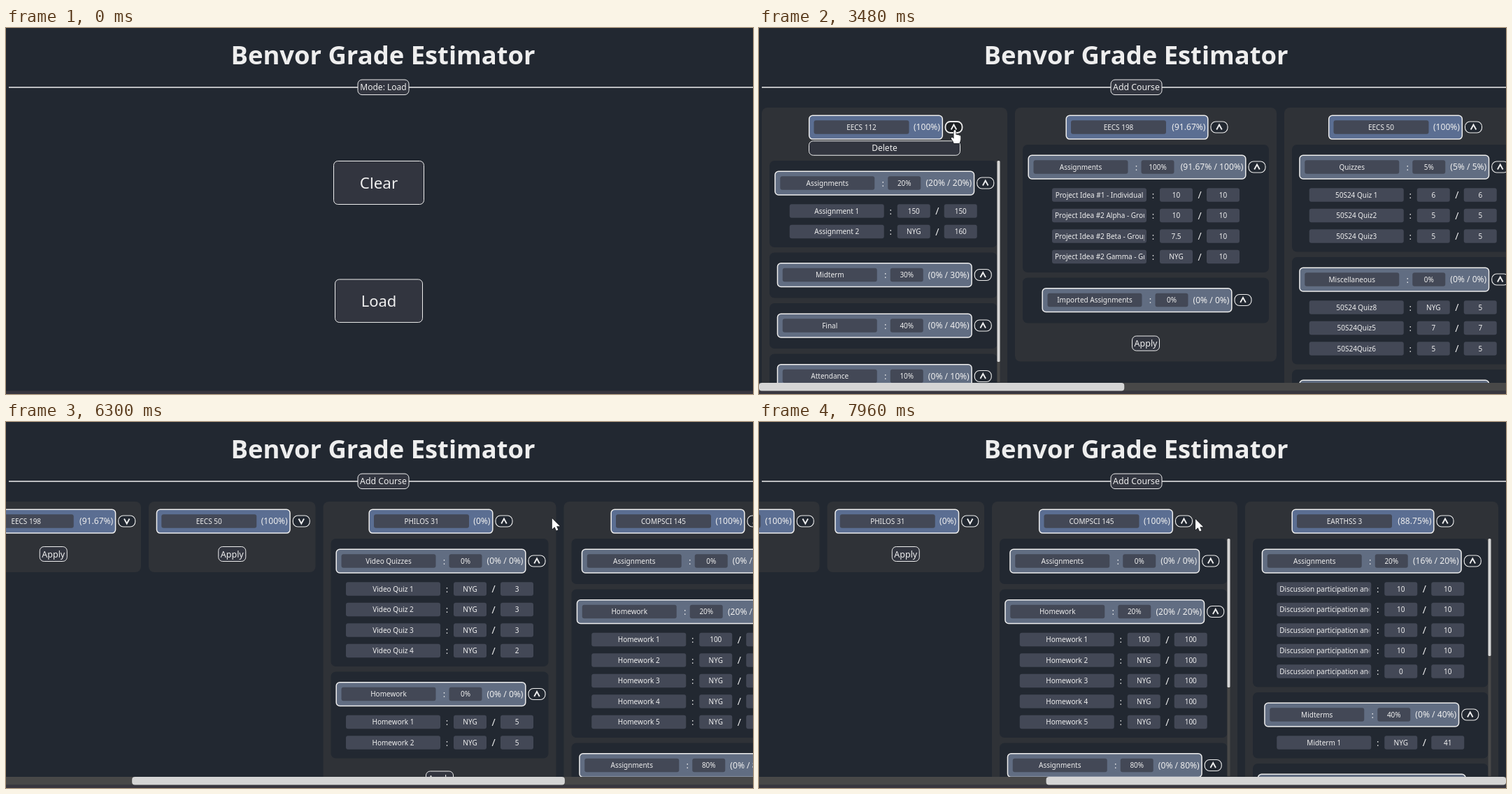
Animation of 1068 by 524 pixels, one loop 8 s. Source, as an HTML page:

```html
<!DOCTYPE html>
<html lang="en">
<head>
<meta charset="utf-8">
<title>Grade Estimator</title>
<style>
  html, body { margin: 0; width: 100%; height: 100%; overflow: hidden; background: #222831; }
  svg { display: block; }
  text { font-family: "Noto Sans", "Open Sans", sans-serif; fill: #eee; white-space: pre; }
</style>
</head>
<body>
<svg id="stage" width="1068" height="524"></svg>
<script>
const W = 1068, H = 524, LOOP = 8000, VIEW_BOTTOM = 508;
const stage = document.getElementById('stage');
const color = {
  page: '#222831', column: '#2f3237', button: '#32353f', hot: '#1d2023', input: '#434856',
  course: '#5b6e92', courseHot: '#272c3c', category: '#616d82', line: '#eeeeee',
  track: '#484848', thumb: '#d5d5d5', edge: '#38363f'
};

const cat = (name, weight, score, rows = []) => ({ name, weight, score, rows });
const series = (name, scores, totals) => scores.map((s, i) => [name + (i + 1), s, totals[i] ?? totals[0]]);

// "content" is the full height of a list that scrolls inside its column.
const courses = [
  { name: 'EECS 112', score: '(100%)', width: 351, content: 349, cats: [
    cat('Assignments', '20%', '(20% / 20%)', series('Assignment ', ['150', 'NYG'], ['150', '160'])),
    cat('Midterm', '30%', '(0% / 30%)'),
    cat('Final', '40%', '(0% / 40%)'),
    cat('Attendance', '10%', '(0% / 10%)')] },
  { name: 'EECS 198', score: '(91.67%)', width: 374, cats: [
    cat('Assignments', '100%', '(91.67% / 100%)', [
      ['Project Idea #1 - Individual', '10', '10'],
      ['Project Idea #2 Alpha - Group Work', '10', '10'],
      ['Project Idea #2 Beta - Group Work', '7.5', '10'],
      ['Project Idea #2 Gamma - Group Work', 'NYG', '10']]),
    cat('Imported Assignments', '0%', '(0% / 0%)')] },
  { name: 'EECS 50', score: '(100%)', width: 343, content: 741, cats: [
    cat('Quizzes', '5%', '(5% / 5%)', [
      ['50S24 Quiz 1', '6', '6'], ['50S24 Quiz2', '5', '5'], ['50S24 Quiz3', '5', '5']]),
    cat('Miscellaneous', '0%', '(0% / 0%)', [
      ['50S24 Quiz8', 'NYG', '5'], ['50S24Quiz5', '7', '7'], ['50S24Quiz6', '5', '5']]),
    cat('Homework', '5%', '(5% / 5%)')] },
  { name: 'PHILOS 31', score: '(0%)', width: 333, cats: [
    cat('Video Quizzes', '0%', '(0% / 0%)', series('Video Quiz ', Array(4).fill('NYG'), ['3', '3', '3', '2'])),
    cat('Homework', '0%', '(0% / 0%)', series('Homework ', ['NYG', 'NYG'], ['5']))] },
  { name: 'COMPSCI 145', score: '(100%)', width: 351, content: 543, cats: [
    cat('Assignments', '0%', '(0% / 0%)'),
    cat('Homework', '20%', '(20% / 20%)', series('Homework ', ['100', 'NYG', 'NYG', 'NYG', 'NYG'], ['100'])),
    cat('Assignments', '80%', '(0% / 80%)')] },
  { name: 'EARTHSS 3', score: '(88.75%)', width: 362, content: 688, cats: [
    cat('Assignments', '20%', '(16% / 20%)', ['10', '10', '10', '10', '0'].map(
      s => ['Discussion participation and notes', s, '10'])),
    cat('Midterms', '40%', '(0% / 40%)', [['Midterm 1', 'NYG', '41']]),
    cat('Final', '40%', '(0.00% / 40%)')] }
];

// Keyframes: [time, value, ...]
const mousePath = [
  [260, 1028, 524], [1030, 598, 412], [1370, 548, 405], [1570, 547, 403], [1840, 547, 403],
  [1910, 555, 408], [2240, 562, 412], [2380, 560, 405], [3120, 312, 97], [3480, 280, 146],
  [3690, 281, 145], [3760, 284, 144], [4370, 549, 141], [4510, 551, 141], [4650, 555, 140],
  [5280, 787, 141], [5420, 787, 141], [6100, 783, 139], [6300, 781, 138], [6650, 714, 141],
  [7130, 716, 142], [7400, 743, 142], [7600, 743, 142], [7960, 624, 139]
];
const scrollPath = [[5640, 0], [6230, 311], [7220, 311], [7470, 492], [7760, 667]];
const collapseTimes = [3690, 4510, 5400, 6790];
const LOADED = 2380;

function sample(path, t) {
  const i = path.findIndex(k => k[0] > t);
  if (i === 0) return path[0].slice(1);
  if (i < 0) return path[path.length - 1].slice(1);
  const a = path[i - 1], b = path[i], f = (t - a[0]) / (b[0] - a[0]);
  return a.slice(1).map((v, n) => v + (b[n + 1] - v) * f);
}

// Drawing helpers append markup for the current picture.
let out = '';

function box(x, y, w, h, r, fill, stroke = 'none', lineWidth = 1) {
  out += `<rect x="${x}" y="${y}" width="${w}" height="${h}" rx="${r}" fill="${fill}" stroke="${stroke}" stroke-width="${lineWidth}"/>`;
}

function text(str, x, cy, size, anchor = 'middle', weight = 400) {
  out += `<text x="${x}" y="${cy + size * 0.36}" font-size="${size}" text-anchor="${anchor}" font-weight="${weight}">${str}</text>`;
}

function clipped(x, y, w, h, drawInside) {
  out += `<svg x="${x}" y="${y}" width="${w}" height="${h}" viewBox="${x} ${y} ${w} ${h}" overflow="hidden">`;
  drawInside();
  out += '</svg>';
}

function input(str, x, cy, w) {
  box(x, cy - 9.7, w, 19.4, 3, color.input);
  if (str.length > 28) clipped(x + 3, cy - 10, w - 6, 20, () => text(str, x + 4, cy, 10, 'start'));
  else text(str, x + w / 2, cy, 10);
}

function button(label, cx, cy, w, h, size, hot) {
  box(cx - w / 2, cy - h / 2, w, h, 6, hot ? color.hot : color.button, color.line, hot ? 1.6 : 1);
  text(label, cx, cy, size);
}

function toggle(x, cy, up, hot) {
  box(x + 0.5, cy - 8, 24, 16, 7, hot ? color.hot : color.page, color.line, hot ? 1.8 : 1.1);
  const d = up ? 3.5 : -3.5;
  out += `<path d="M${x + 8.7} ${cy + d}l3.8 ${-2 * d}l3.8 ${2 * d}" fill="none" stroke="${color.line}" stroke-width="1.9"/>`;
}

const scoreWidth = s => 7 * s.replace(/\D/g, '').length + (s.includes('.') ? 5 : 0);

function drawCategory(c, panelX, panelW, y) {
  const height = 65 + 29.5 * c.rows.length, w = 258 + scoreWidth(c.score);
  const x = panelX + (panelW - w - 25) / 2, cy = y + 32;
  box(panelX, y, panelW, height, 7, color.page);
  box(x + 0.7, y + 15.3, w - 1.4, 33.6, 5, color.category, color.line, 1.5);
  input(c.name, x + 8, cy, 135);
  text(':', x + 155, cy, 13);
  input(c.weight, x + 162, cy, 47);
  text(c.score, x + w - 4, cy, 12.1, 'end');
  toggle(x + w + 3, cy, true);

  const left = panelX + panelW / 2 - 134;
  c.rows.forEach(([name, score, total], i) => {
    const rowY = y + 72 + 29.5 * i;
    input(name, left, rowY, 135);
    text(':', left + 144.5, rowY, 13);
    input(score, left + 154, rowY, 47);
    text('/', left + 211, rowY, 14);
    input(total, left + 221, rowY, 47);
  });
  return height;
}

function drawCourse(c, x, w, collapsed, mouse) {
  const headW = 171 + scoreWidth(c.score), headX = x + (w - headW - 25) / 2;
  const toggleX = headX + headW + 3;
  const over = mouse[1] > 125 && mouse[1] < 160 && mouse[0] > headX && mouse[0] < toggleX + 25;
  const overToggle = over && mouse[0] >= toggleX, overHead = over && mouse[0] < headX + headW;
  const shift = over ? 23 : 0, top = 167 + shift;
  const scrolls = c.content && !collapsed;
  const listHeight = c.cats.reduce((sum, k) => sum + 72.5 + 29.5 * k.rows.length, -7.5);
  const end = collapsed ? 160 + shift : top + listHeight;

  box(x, 114, w, scrolls ? 450 : end + 55 - 114, 8, color.column);
  box(headX + 0.7, 125.3, headW - 1.4, 33.8, 5, overHead ? color.courseHot : color.course, color.line, overHead ? 2 : 1.5);
  input(c.name, headX + 7.5, 142, 136);
  text(c.score, headX + headW - 4, 142, 12.1, 'end');
  toggle(toggleX, 142, !collapsed, overToggle);
  if (over) button('Delete', headX + (headW + 25) / 2, 172, headW + 24, 20.5, 12);

  if (!collapsed) {
    let y = top;
    for (const k of c.cats) y += drawCategory(k, x + 11, w - (scrolls ? 25.5 : 22), y) + 7.5;
  }
  if (scrolls) {
    const view = 507 - top;
    box(x + w - 14.5, top, 4, view, 0, color.track);
    box(x + w - 14.5, top, 4, view * view / c.content, 1.5, color.thumb);
  } else {
    button('Apply', x + w / 2, end + 29, 39, 21, 12.5);
  }
  return overToggle;
}

function drawCourses(t, mouse) {
  const [scroll] = sample(scrollPath, t);
  let x = 4, pointing = false;
  clipped(0, 100, W, VIEW_BOTTOM - 100, () => courses.forEach((c, i) => {
    const collapsed = t >= collapseTimes[i];
    const w = collapsed ? 217.5 + scoreWidth(c.score) : c.width;
    pointing = drawCourse(c, x - scroll, w, collapsed, mouse) || pointing;
    x += w + 11;
  }));
  box(0, VIEW_BOTTOM, W, 11.5, 0, color.track);
  box(scroll * W / x, VIEW_BOTTOM, W * W / x, 11.5, 4, color.thumb);
  return pointing;
}

const arrowShape = 'M0 0V15.5L3.6 12.2L6 17.4L8.6 16.2L6.3 11.2H11.2Z';
const handShape = 'M-1.5 1.2Q0 -1 1.5 1.2V7Q3 5.8 4 7.4Q5.4 6.4 6.2 8Q8.3 7.2 8.3 9.5V13.5Q8 16 6.6 19H-1.4Q-2.2 16 -5 12.8Q-5.8 10.6 -3.6 10.8L-1.5 12.5Z';

function drawCursor([x, y], pointing) {
  out += `<path transform="translate(${x} ${y})" d="${pointing ? handShape : arrowShape}" fill="#fff" stroke="#15181c" stroke-width="1.2" stroke-linejoin="round" paint-order="stroke"/>`;
}

function draw(t) {
  const mouse = sample(mousePath, t), loaded = t >= LOADED;
  let pointing;
  out = '';
  box(0, 0, W, H, 0, color.page);
  box(0, 519.5, W, 4.5, 0, color.edge);

  text('Benvor Grade Estimator', 539, 38.5, 36.4, 'middle', 700);
  box(4, 84.2, W, 1.5, 0, color.line);
  button(loaded ? 'Add Course' : 'Mode: Load', 539.5, 84.8, 73, 21.5, loaded ? 12.3 : 12);

  if (loaded) {
    pointing = drawCourses(t, mouse);
  } else {
    pointing = mouse[0] > 470 && mouse[0] < 596 && mouse[1] > 360 && mouse[1] < 422;
    button('Clear', 533, 221.5, 129, 62, 22.4);
    button('Load', 533, 390.7, 125, 61.5, 22, pointing);
  }
  if (t >= 260) drawCursor(mouse, pointing);
  stage.innerHTML = out;
}

function tick() {
  draw(performance.now() % LOOP);
  requestAnimationFrame(tick);
}
tick();
</script>
</body>
</html>
```
